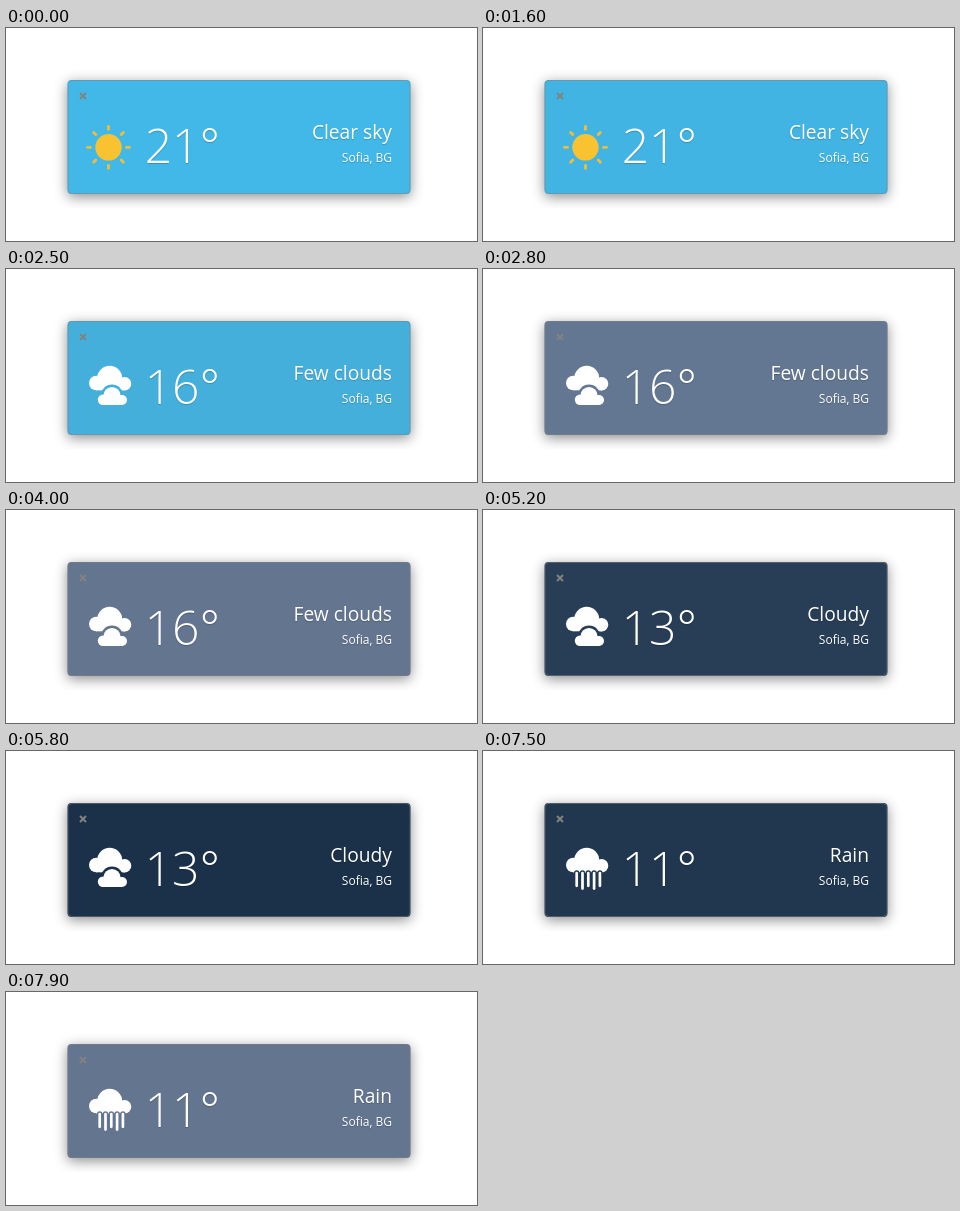
Write an HTML page with a canvas that moves like this. It is 471x213 px and loops after 8000 ms.

```html
<!DOCTYPE html>
<html lang="en">
<head>
<meta charset="utf-8">
<title>Weather card</title>
<style>
  html, body { margin: 0; width: 100%; height: 100%; overflow: hidden; background: #fff; }
  canvas { display: block; width: 471px; height: 213px; }
</style>
</head>
<body>
<canvas id="stage"></canvas>
<script>
const W = 471, H = 213, LOOP = 8000, TICK = 100;
const canvas = document.getElementById('stage');
const ctx = canvas.getContext('2d');
const ratio = window.devicePixelRatio || 1;
canvas.width = W * ratio;
canvas.height = H * ratio;

const BRIGHT = [66, 184, 232], BLUE = [66, 180, 227];
const SLATE = [100, 117, 144], NAVY = [26, 49, 73];

// The text switches at once; the background eases over after a short delay.
const scenes = [
  { at: -200, temp: 21, sky: 'Clear sky', from: BRIGHT, to: BLUE, icon: drawSun },
  { at: 2300, temp: 16, sky: 'Few clouds', from: BLUE, to: SLATE, icon: drawClouds },
  { at: 4800, temp: 13, sky: 'Cloudy', from: SLATE, to: NAVY, icon: drawClouds },
  { at: 7300, temp: 11, sky: 'Rain', from: NAVY, to: SLATE, icon: drawRain }
];

const rgb = c => `rgb(${c.map(Math.round).join(',')})`;

function easeInOut(x) {
  x = Math.min(1, Math.max(0, x));
  return x < 0.5 ? 4 * x ** 3 : 1 - (2 - 2 * x) ** 3 / 2;
}

function line(x1, y1, x2, y2, width, color, cap = 'round') {
  ctx.lineWidth = width;
  ctx.lineCap = cap;
  ctx.strokeStyle = color;
  ctx.beginPath();
  ctx.moveTo(x1, y1);
  ctx.lineTo(x2, y2);
  ctx.stroke();
}

function disc(x, y, r) {
  ctx.beginPath();
  ctx.arc(x, y, r, 0, Math.PI * 2);
  ctx.fill();
}

function drawCard(bg) {
  ctx.save();
  ctx.beginPath();
  ctx.rect(40, 38, 390, 142);
  ctx.clip();
  ctx.beginPath();
  ctx.roundRect(61.5, 52, 343, 114, 4);
  ctx.shadowColor = 'rgba(0,0,0,0.45)';
  ctx.shadowBlur = 13 * ratio;
  ctx.shadowOffsetY = 3 * ratio;
  ctx.fillStyle = bg;
  ctx.fill();
  ctx.restore();
  ctx.beginPath();
  ctx.roundRect(62, 52.5, 342, 113, 4);
  ctx.lineWidth = 1;
  ctx.strokeStyle = 'rgba(130,130,130,0.5)';
  ctx.stroke();
}

function drawClose() {
  const color = '#82827f';
  line(74, 65, 80, 71, 2, color, 'butt');
  line(80, 65, 74, 71, 2, color, 'butt');
}

function drawSun() {
  const x = 102.5, y = 119.3;
  ctx.fillStyle = '#f8c231';
  disc(x, y, 13.2);
  for (let i = 0; i < 8; i++) {
    const dx = Math.cos(i * Math.PI / 4), dy = Math.sin(i * Math.PI / 4);
    line(x + 18 * dx, y + 18 * dy, x + 21 * dx, y + 21 * dy, 2.8, '#f3bd35');
  }
}

function bigCloud() {
  ctx.fillStyle = '#fff';
  disc(90.3, 114, 7.3);
  disc(103.7, 109.3, 12.5);
  disc(118.6, 114.7, 6.7);
  ctx.fillRect(90, 111, 29, 10.3);
}

function smallCloud(color, grow) {
  ctx.fillStyle = color;
  disc(97, 130.8, 5.2 + grow);
  disc(106, 126.5, 8.6 + grow);
  disc(116, 131, 5 + grow);
  ctx.fillRect(97, 128, 19, 8 + grow);
}

function drawClouds(bg) {
  bigCloud();
  smallCloud(bg, 2.4);
  smallCloud('#fff', 0);
}

function drawRain(bg) {
  bigCloud();
  const drops = [0, 1, 2, 3, 4].map(i => ({
    x: 93.7 + i * 5.8, top: 122, end: i % 2 ? 137.6 : 134.8
  }));
  for (const d of drops) line(d.x, d.top, d.x, d.end, 5.4, bg);
  for (const d of drops) line(d.x, d.top, d.x, d.end, 2.7, '#fff');
}

function text(str, x, y, size, weight, align) {
  ctx.font = `${weight} ${size}px "Open Sans", sans-serif`;
  ctx.textAlign = align;
  ctx.fillStyle = '#fff';
  ctx.fillText(str, x, y);
}

function drawText(scene) {
  ctx.save();
  ctx.shadowColor = 'rgba(0,0,0,0.2)';
  ctx.shadowBlur = ratio;
  ctx.shadowOffsetY = ratio;
  text(scene.temp + '°', 138.7, 135, 48, 300, 'left');
  text(scene.sky, 386, 111, 19.2, 400, 'right');
  text('Sofia, BG', 386, 134, 12, 400, 'right');
  ctx.restore();
}

function draw(t) {
  const scene = scenes.filter(s => s.at <= t).pop();
  const mix = easeInOut((t - scene.at - 50) / 550);
  const bg = rgb(scene.from.map((v, i) => v + (scene.to[i] - v) * mix));
  ctx.setTransform(ratio, 0, 0, ratio, 0, 0);
  ctx.fillStyle = '#fff';
  ctx.fillRect(0, 0, W, H);
  drawCard(bg);
  drawClose();
  scene.icon(bg);
  drawText(scene);
}

const start = performance.now();
function frame() {
  const t = (performance.now() - start) % LOOP;
  draw(Math.floor(t / TICK) * TICK);
  requestAnimationFrame(frame);
}
frame();
</script>
</body>
</html>
```
